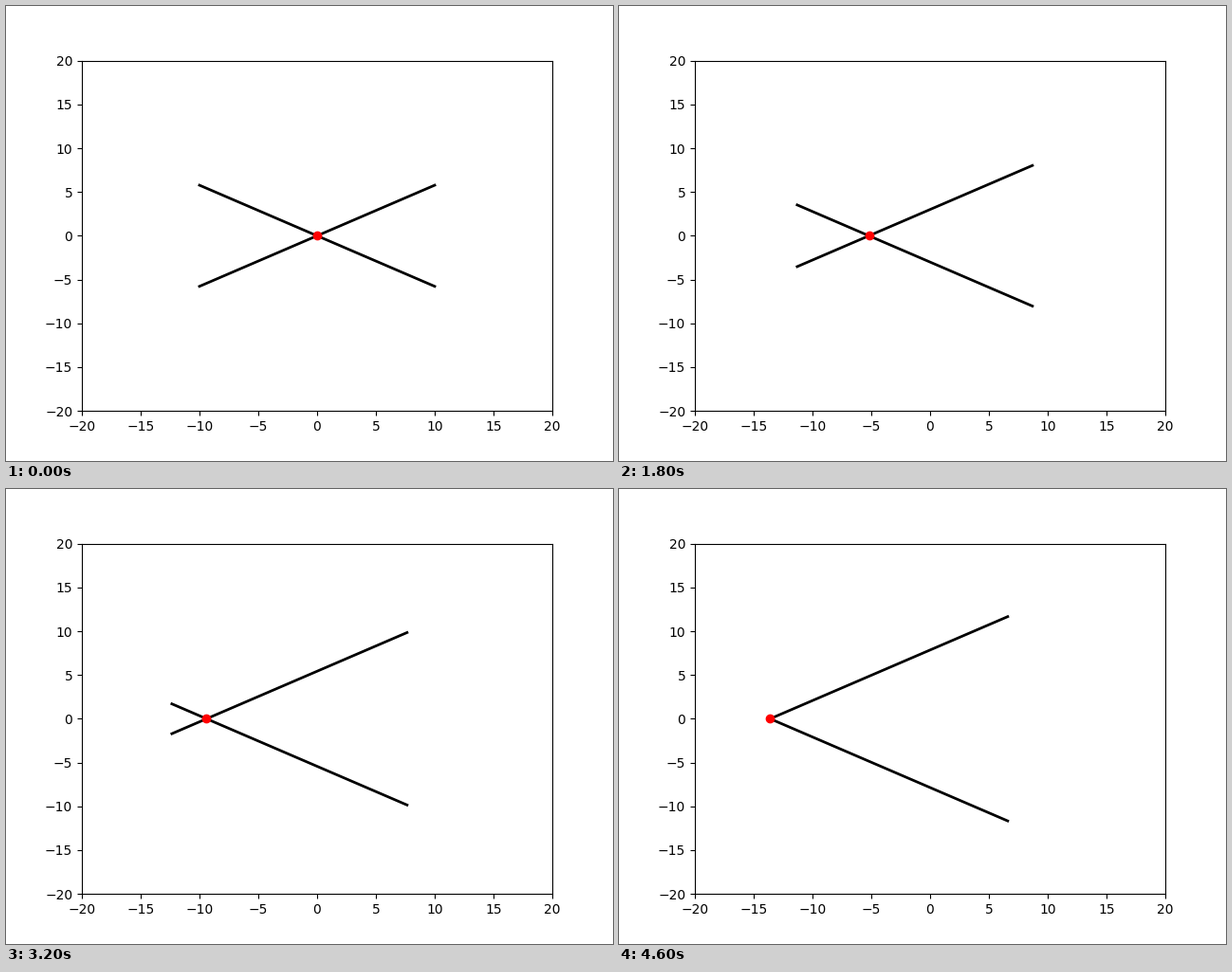
Write a matplotlib script that moves like this. It is 640x480 px and loops after 4670 ms.

```python
import numpy as np
import matplotlib.pyplot as plt
from matplotlib.animation import FuncAnimation

FRAMES = 70
LOOP_MS = 4670
ANGLE = np.radians(30)
SPEED = 0.1  # distance along each line's normal per frame

fig, ax = plt.subplots(figsize=(6.4, 4.8), dpi=100)
ax.set_xlim(-20, 20)
ax.set_ylim(-20, 20)

base_x = np.array([-10.0, 10.0])
base_y = base_x * np.tan(ANGLE)

upper, = ax.plot([], [], color="black", lw=2)
lower, = ax.plot([], [], color="black", lw=2)
crossing, = ax.plot([], [], "ro")


def update(frame):
    shift = SPEED * frame
    x = base_x - shift * np.sin(ANGLE)
    y = base_y + shift * np.cos(ANGLE)
    upper.set_data(x, y)
    lower.set_data(x, -y)
    # The crossing outruns the lines: normal speed divided by sin(angle)
    crossing.set_data([-shift / np.sin(ANGLE)], [0])
    return upper, lower, crossing


def init():
    return update(0)


anim = FuncAnimation(fig, update, frames=FRAMES, init_func=init,
                     interval=LOOP_MS / FRAMES, repeat=True, repeat_delay=0)

plt.show()
```
